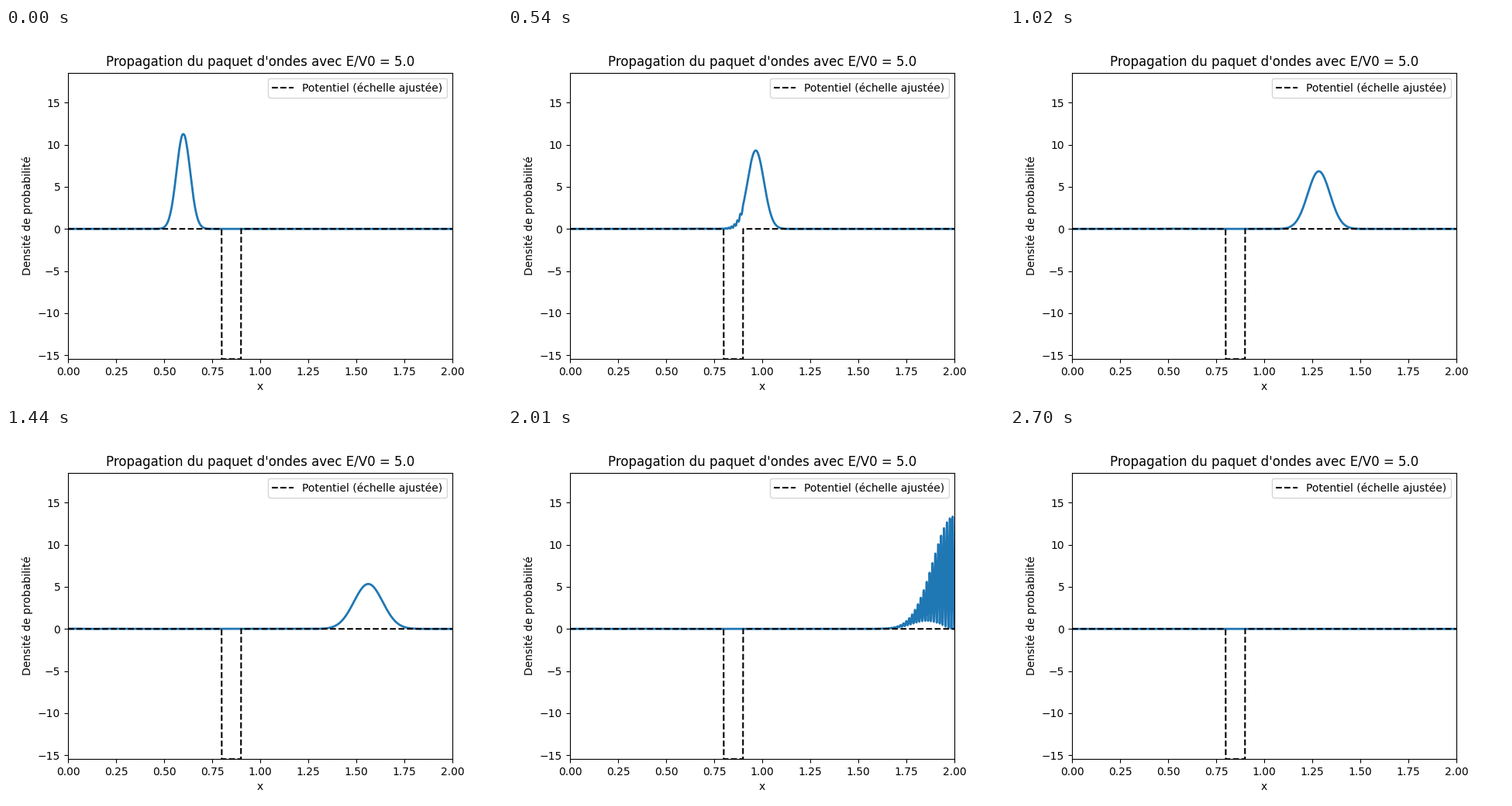
A matplotlib script that plays this animation: 640 px wide and 480 px high, repeating every 2.73 s.

```python
import math

import numpy as np
import matplotlib.pyplot as plt
from matplotlib.animation import FuncAnimation

DT, DX = 1e-7, 1e-3
NX = 2000
SAMPLES = 90              # density snapshots, then one empty frame
PAIRS = 500               # leapfrog pairs between two snapshots
CENTER, SIGMA = 0.6, 0.05
V0, RATIO = -4000, 5.0

x = np.linspace(0, (NX - 1) * DX, NX)
potential = np.where((x >= 0.8) & (x <= 0.9), V0, 0.0)


def simulate():
    """Leapfrog Schrödinger solver on a grid with fixed walls."""
    s = DT / DX**2
    k = math.sqrt(2 * abs(RATIO * V0))
    norm = 1 / math.sqrt(SIGMA * math.sqrt(math.pi))
    psi = norm * np.exp(1j * k * x - (x - CENTER)**2 / (2 * SIGMA**2))
    re, im = psi.real.copy(), psi.imag.copy()
    diag = 2 * (s + potential[1:-1] * DT)

    def kinetic(f):
        return s * (f[2:] + f[:-2]) - diag * f[1:-1]

    density = np.zeros((SAMPLES + 1, NX))
    for n in range(SAMPLES):
        for step in range(PAIRS):
            before = im[1:-1].copy() if step == 0 else None
            im[1:-1] += kinetic(re)
            if step == 0:
                density[n, 1:-1] = re[1:-1]**2 + im[1:-1] * before
            re[1:-1] -= kinetic(im)
    return density


density = simulate()
peak = density.max()

fig, ax = plt.subplots(figsize=(6.4, 4.8), dpi=100)
line, = ax.plot(x, density[0], color="tab:blue", lw=2)
ax.plot(x, potential / abs(V0) * peak, "k--",
        label="Potentiel (échelle ajustée)")
ax.set_xlim(0, 2)
ax.set_ylim(-peak, 1.2 * peak)
ax.set_xlabel("x")
ax.set_ylabel("Densité de probabilité")
ax.set_title(f"Propagation du paquet d'ondes avec E/V0 = {RATIO}")
ax.legend(loc="upper right")


def draw(n):
    line.set_ydata(density[n])
    return line,


anim = FuncAnimation(fig, draw, frames=SAMPLES + 1, interval=30,
                     repeat=True, repeat_delay=0, blit=False)
plt.show()
```
